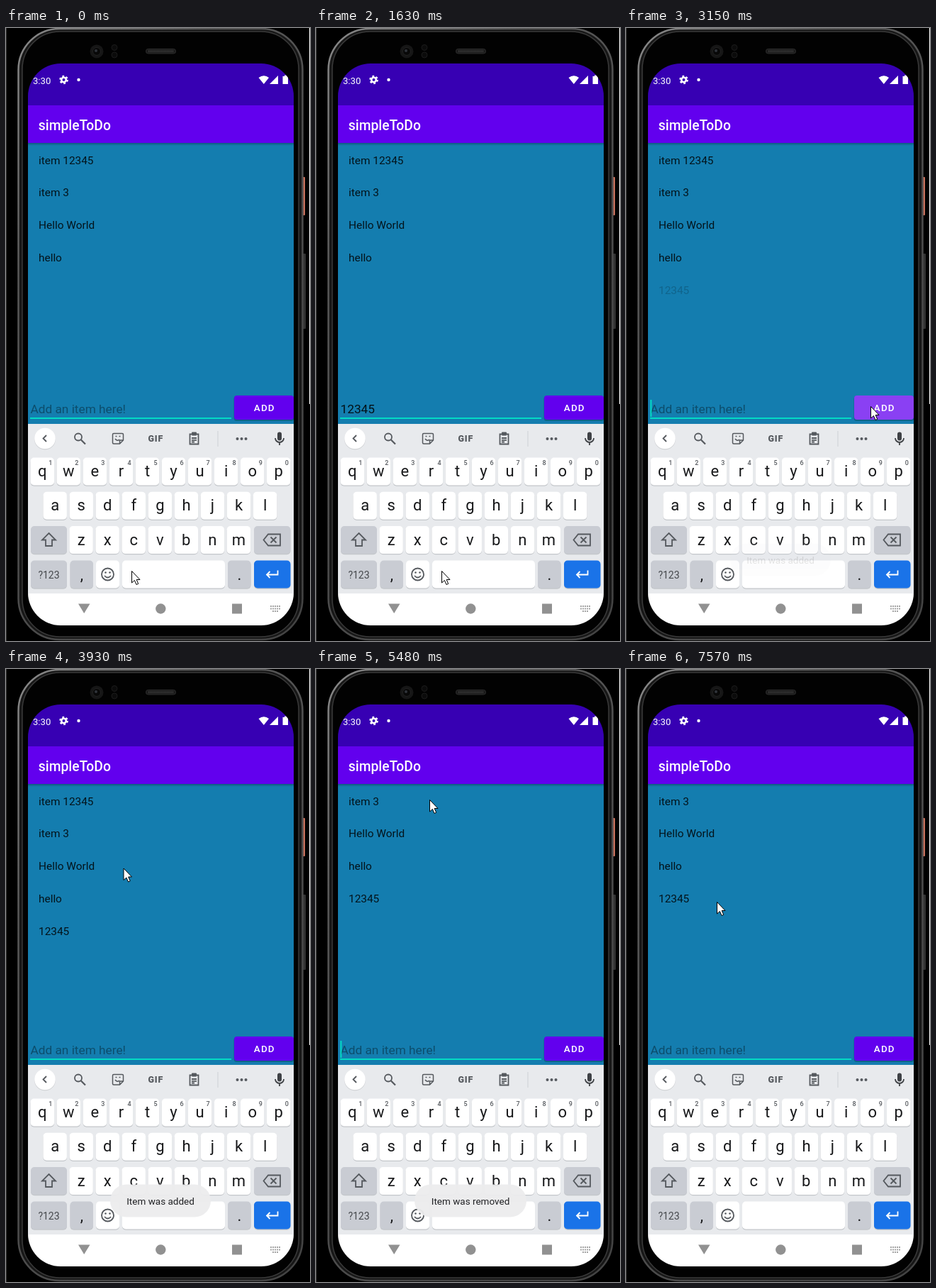
Write an HTML page that moves like this. It is 429x864 px and loops after 8 s.

```html
<!DOCTYPE html>
<html lang="en">
<head>
<meta charset="utf-8">
<title>To-do list</title>
<style>
  html, body { margin: 0; width: 100%; height: 100%; overflow: hidden; background: #000; }
  svg { display: block; width: 100%; height: 100%; font-family: Roboto, sans-serif; }
  .mid { text-anchor: middle; }
  .row { font-size: 15.4px; fill: #000; fill-opacity: .85; }
  .field { font-size: 17.25px; }
  .line { fill: none; stroke: #55595e; stroke-width: 1.8; }
  .letter { font-size: 22px; fill: #17181a; text-anchor: middle; }
  .hint { font-size: 9px; font-weight: 500; fill: #55595e; text-anchor: middle; }
</style>
</head>
<body>
<svg viewBox="0 0 429 864">
  <defs>
    <clipPath id="screen"><rect x="31" y="50" width="375" height="792" rx="46"/></clipPath>
    <linearGradient id="shade" x2="0" y2="1">
      <stop stop-opacity=".28"/><stop offset="1" stop-opacity="0"/>
    </linearGradient>
    <linearGradient id="metal" x2=".6" y2="1">
      <stop stop-color="#8a8a8a"/><stop offset=".3" stop-color="#585858"/><stop offset="1" stop-color="#444"/>
    </linearGradient>
  </defs>

  <!-- Phone body -->
  <rect width="429" height="864" fill="#000"/>
  <rect width="1" height="864" fill="#333"/>
  <rect x="428" width="1" height="530" fill="#fff"/>
  <rect x="418" y="210" width="4" height="54" rx="1" fill="#c9705c"/>
  <rect x="418" y="318" width="5" height="106" rx="1" fill="#333"/>
  <rect x="17.5" y="1" width="401" height="861" rx="58" fill="#171717" stroke="url(#metal)" stroke-width="2.5"/>
  <rect x="23" y="5" width="390" height="853" rx="53" fill="#020202" stroke="#3a3a3a" stroke-width="1.5"/>
  <circle cx="128" cy="33" r="9.5" fill="#161616"/>
  <circle cx="128" cy="33" r="5.5" fill="#080808" stroke="#222"/>
  <circle cx="127" cy="32" r="2" fill="#30343a"/>
  <g fill="#0b0b0b" stroke="#1b1b1b"><circle cx="153" cy="27.5" r="4"/><circle cx="153" cy="38" r="4"/></g>
  <rect x="197.5" y="29.5" width="42" height="6.5" rx="3" fill="#1b1b1b" stroke="#2c2c2c"/>
  <path d="M201 32.700H236" stroke="#3c3c3c" stroke-width="3" stroke-dasharray="1 1"/>

  <g clip-path="url(#screen)">
    <rect x="31" y="50" width="375" height="59" fill="#3700b3"/>
    <rect x="31" y="162" width="375" height="396" fill="#147daf"/>
    <rect x="31" y="109" width="375" height="53" fill="#6200ee"/>
    <rect x="31" y="162" width="375" height="4" fill="url(#shade)"/>

    <!-- Status bar -->
    <g fill="#fff">
      <text x="38" y="78.500" font-size="13.1">3:30</text>
      <circle cx="81.500" cy="73" r="3.300" fill="none" stroke="#fff" stroke-width="2.600"/>
      <circle cx="81.500" cy="73" r="5.200" fill="none" stroke="#fff" stroke-width="2.200" stroke-dasharray="2.720"/>
      <circle cx="102.500" cy="73" r="2.200"/>
      <path d="M356.500 70Q364 64.500 371 70L363.800 79ZM384 67V79H372Z"/>
      <path d="M391 68h2v-1.500h3V68h2v11h-7.500V68Z"/>
    </g>
    <text x="45.800" y="143.500" font-size="19.3" font-weight="500" fill="#fff">simpleToDo</text>

    <g id="rows"></g>

    <!-- Entry field and button -->
    <text id="hint" class="field" x="34.500" y="542.500" fill-opacity=".38">Add an item here!</text>
    <text id="draft" class="field" x="34.500" y="542.500" fill-opacity=".87"></text>
    <rect x="34" y="549" width="284" height="2" fill="#03dac5"/>
    <rect id="caret" y="524" width="2" height="24" fill="#03dac5"/>
    <rect x="321.500" y="519" width="85" height="35" rx="4" opacity=".22"/>
    <rect x="322" y="518" width="84" height="34" rx="4" fill="#6200ee"/>
    <rect id="press" x="322" y="518" width="84" height="34" rx="4" fill="#fff"/>
    <text class="mid" x="364.800" y="540.300" font-size="13.4" font-weight="500" letter-spacing="1.2" fill="#fff">ADD</text>

    <!-- Keyboard -->
    <rect x="31" y="558" width="375" height="239" fill="#e8eaed"/>
    <circle cx="55" cy="579.500" r="15" fill="#cfd1d4"/>
    <circle cx="55" cy="578.500" r="14.800" fill="#fff"/>
    <g class="line">
      <path d="M57 574l-4.500 4.500 4.500 4.500"/>
      <circle cx="102" cy="576.500" r="5"/><path d="M106 580.500l6 6" stroke-width="2.200"/>
      <path d="M152 571.500h12q1.500 0 1.500 1.500v8l-5 5h-8.500q-1.500 0-1.500-1.500v-11.500q0-1.500 1.500-1.500M160.500 586v-5h5M154 579q3 4 6 1M154.500 575.500h2M159.500 575.500h2" stroke-width="1.500"/>
      <path d="M259.500 572.500h12v14h-12zM262.500 573.500h6M262 578h7M262 580.800h7M262 583.500h4"/>
      <path d="M299 568v22" stroke="#cdd0d4" stroke-width="1"/>
      <path d="M380 578a6 6 0 0 0 12 0M386 584v4" stroke="#3f4246"/>
    </g>
    <g fill="#55595e">
      <rect x="262" y="569.500" width="7" height="4" rx="1"/>
      <circle cx="326.500" cy="579" r="2"/><circle cx="332.500" cy="579" r="2"/><circle cx="338.500" cy="579" r="2"/>
      <rect x="383" y="569.500" width="6" height="12" rx="3" fill="#3f4246"/>
      <text class="mid" x="211.300" y="583" font-size="12.5" font-weight="900" letter-spacing=".8">GIF</text>
    </g>
    <g id="keys"></g>
    <g class="line" stroke-width="2">
      <path d="M60.500 712l9.500 9.500h-5v8.500h-9v-8.500h-5z"/>
      <path d="M370 713.500h17v16h-17l-6.500-8zM373.500 717.500l8 8M381.500 717.500l-8 8"/>
      <circle cx="143.500" cy="770" r="8.500"/><path d="M139 772q4.500 5 9 0"/>
      <path d="M383.500 764.500v6h-15M372.500 766l-4.500 4.500 4.500 4.500" stroke="#fff"/>
    </g>
    <g fill="#55595e"><circle cx="140.500" cy="767.500" r="1.300"/><circle cx="146.500" cy="767.500" r="1.300"/></g>
    <text class="mid" x="60.500" y="775.500" font-size="14" fill="#45484c">?123</text>
    <text class="letter" x="107" y="778" font-size="20">,</text>
    <text class="letter" x="329.500" y="778" font-size="20">.</text>

    <!-- Navigation bar -->
    <rect x="31" y="797" width="375" height="45" fill="#fff"/>
    <g fill="#919191">
      <path d="M102 811.500h16.500L110.200 825z"/>
      <circle cx="218.300" cy="818.500" r="7.200"/>
      <rect x="319" y="811.500" width="14" height="14"/>
    </g>
    <path d="M373 815h14M373 818.500h14M376 822h8" stroke="#a3a3a3" stroke-width="1.800" stroke-dasharray="2 1"/>

    <g id="toast">
      <rect y="726.500" height="46" rx="23" fill="#ececee" fill-opacity=".95"/>
      <text class="mid" x="218" y="754.800" font-size="13.5" fill="#202124"></text>
    </g>
  </g>
  <path id="pointer" d="M.5 .5V17L4.400 13.500 7 19.500 9.700 18.300 7.200 12.500H12Z" fill="#fff" stroke="#000" stroke-linejoin="round"/>
</svg>

<script>
const LOOP = 8000;
const $ = id => document.getElementById(id);
const clamp = v => Math.max(0, Math.min(1, v));
const ramp = (t, from, to) => clamp((t - from) / (to - from));
const ease = p => (1 - Math.cos(Math.PI * p)) / 2;

function add(parent, tag, attrs, text = '') {
  const el = document.createElementNS('http://www.w3.org/2000/svg', tag);
  for (const name in attrs) el.setAttribute(name, attrs[name]);
  el.textContent = text;
  return parent.appendChild(el);
}

function addKey(x, y, width, fill = '#fff') {
  const box = { x, width, height: 39, rx: 5 };
  add($('keys'), 'rect', { ...box, y: y + 1.2, fill: '#c3c6ca' });
  add($('keys'), 'rect', { ...box, y, fill });
}

const PITCH = 37.05;
[['qwertyuiop', 51.3], ['asdfghjkl', 69.2], ['zxcvbnm', 106.1]].forEach(([letters, first], row) => {
  [...letters].forEach((letter, i) => {
    const x = first + i * PITCH, y = 605.5 + row * 48.3;
    addKey(x - 16.7, y, 33.4);
    add($('keys'), 'text', { class: 'letter', x, y: y + 26.5 }, letter);
    if (!row) add($('keys'), 'text', { class: 'hint', x: x + 11.5, y: y + 10.5 }, (i + 1) % 10);
  });
});
const GREY = '#c9ccd3';
addKey(35, 702, 51, GREY);
addKey(350, 702, 51.5, GREY);
addKey(35, 750.5, 51, GREY);
addKey(90.5, 750.5, 32.5, GREY);
addKey(127, 750.5, 33);
addKey(164, 750.5, 145);
addKey(313, 750.5, 32.5, GREY);
addKey(350, 750.5, 51.5, '#1a73e8');

const rows = ['item 12345', 'item 3', 'Hello World', 'hello', '12345']
  .map(label => add($('rows'), 'text', { class: 'row', x: 46 }, label));

const bursts = [[0, 0, 1], [150, 770, 4], [1050, 1200, 2], [1630, 1630, 1], [2190, 3150, 8],
  [3270, 3930, 6], [4080, 4230, 2], [4350, 4350, 1], [4630, 4630, 1], [5060, 5480, 4],
  [5630, 5630, 1], [5910, 6540, 6], [6910, 6910, 1], [7060, 7570, 5]];
const refreshes = bursts.flatMap(([first, last, count]) =>
  Array.from({ length: count }, (_, i) => first + (last - first) * i / Math.max(1, count - 1)));

const typed = [350, 560, 770, 1050, 1200];
const ADDED = 3010;
const caretOn = [[150, 1630], [2190, 2700], [ADDED, 3530], [4080, 4630], [5060, 5630], [6030, 6540], [7060, 7570]];
const path = [[0, 177, 765], [2060, 177, 765], [2450, 275, 640], [2800, 345, 533], [3150, 345, 533],
  [3400, 285, 485], [3600, 232, 425], [3930, 165.5, 280.5], [4230, 160, 186], [4350, 160, 184],
  [5800, 160, 184], [6050, 205, 232], [6250, 217, 310], [6540, 200, 395], [6780, 200, 395],
  [6910, 169, 375], [7250, 140, 315], [7570, 128, 328], [LOOP, 128, 328]];

function pointerAt(t) {
  const i = path.findIndex(([time]) => time > t);
  const [t0, x0, y0] = path[i - 1], [t1, x1, y1] = path[i];
  const p = ramp(t, t0, t1);
  return [x0 + (x1 - x0) * p, y0 + (y1 - y0) * p];
}

function showToast(label, width, opacity) {
  const [box, text] = $('toast').children;
  box.setAttribute('x', 218 - width / 2);
  box.setAttribute('width', width);
  text.textContent = label;
  $('toast').setAttribute('opacity', opacity);
}

function draw(now) {
  const clock = now % LOOP;
  const t = refreshes.findLast(time => time <= clock + .5);

  const draft = t < ADDED ? '12345'.slice(0, typed.filter(time => time <= t).length) : '';
  $('draft').textContent = draft;
  $('hint').setAttribute('visibility', draft ? 'hidden' : 'visible');
  $('caret').setAttribute('x', 34.3 + (draft ? $('draft').getComputedTextLength() : 0));
  $('caret').setAttribute('visibility', caretOn.some(([on, off]) => t >= on && t < off) ? 'visible' : 'hidden');
  $('press').setAttribute('opacity', .25 * ramp(t, 2850, 3010) * (1 - ramp(t, 3150, 3420)));

  const shift = ease(ramp(t, 5170, 5430));
  rows.forEach((row, i) => row.setAttribute('y', 191.5 + 45.9 * (i ? i - shift : 0)));
  rows[0].setAttribute('opacity', 1 - ramp(t, 5000, 5130));
  rows[4].setAttribute('opacity', ramp(t, 3110, 3280));

  if (t < 5200) showToast('Item was added', 142, ramp(t, 3110, 3430) * (1 - ramp(t, 5000, 5200)));
  else showToast('Item was removed', 158, ramp(t, 5120, 5440) * (1 - ramp(t, 7130, 7500)));

  $('pointer').setAttribute('transform', `translate(${pointerAt(t)})`);
  requestAnimationFrame(draw);
}
requestAnimationFrame(draw);
</script>
</body>
</html>
```
